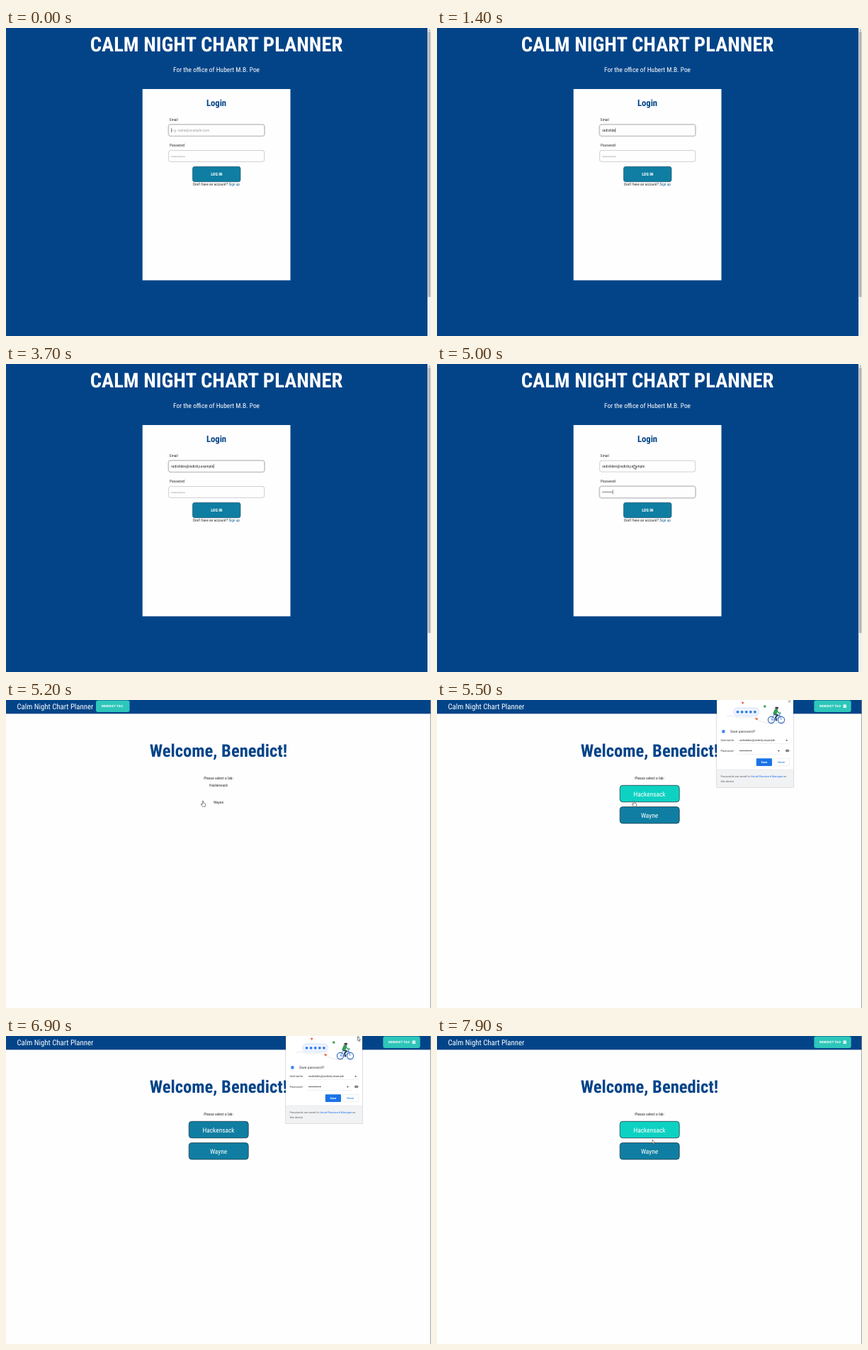
Write an HTML page that moves like this. It is 600 px wide and 434 px high and loops after 8 s.

```html
<!DOCTYPE html>
<html lang="en">
<head>
<meta charset="utf-8">
<title>Sleep lab login</title>
<style>
  html, body { margin: 0; width: 100%; height: 100%; overflow: hidden; background: #fffeff; }
  svg { display: block; width: 600px; height: 434px; }
  text { font-family: Roboto, "Liberation Sans", sans-serif; text-rendering: geometricPrecision; white-space: pre; }
  .cond { font-family: "Roboto Condensed", Roboto, "Liberation Sans", sans-serif; font-stretch: 75%; }
  .bold { font-weight: 700; }
  .mid { text-anchor: middle; }
</style>
</head>
<body>
<svg id="stage" viewBox="0 0 600 434" xmlns="http://www.w3.org/2000/svg"></svg>
<script>
const NAVY = '#034488', BLUE = '#0f7ea2', INK = '#2a2a2a', LINK = '#1a73e8';
const LOOP = 8000, STEP = 100;
const EMAIL = 'radishdev@radishy.example';
const stage = document.getElementById('stage');
const $ = id => document.getElementById(id);

// Narrow plain Roboto evenly when no condensed face is available.
stage.innerHTML = '<text id="a" class="cond" font-size="50">Sample words</text><text id="b" font-size="50">Sample words</text>';
const narrow = $('a').getComputedTextLength() < 0.95 * $('b').getComputedTextLength() ? 1 : 0.88;

const text = (x, y, size, str, fill = INK, cls = 'cond', id = '') =>
  `<text ${id && `id="${id}"`} class="${cls}" font-size="${size}" fill="${fill}" ` +
  `transform="translate(${x} ${y}) scale(${cls.includes('cond') ? narrow : 1} 1)">${str}</text>`;
const rect = (x, y, w, h, fill, r = 0, more = '') =>
  `<rect x="${x}" y="${y}" width="${w}" height="${h}" rx="${r}" fill="${fill}" ${more}/>`;
const circle = (x, y, r, fill, more = '') => `<circle cx="${x}" cy="${y}" r="${r}" fill="${fill}" ${more}/>`;
const path = (d, fill, more = '') => `<path d="${d}" fill="${fill}" ${more}/>`;
const line = (color, w) => `stroke="${color}" stroke-width="${w}"`;
const dots = (n, x, y, gap, r, fill) =>
  Array.from({ length: n }, (_, i) => circle(x + i * gap, y, r, fill)).join('');

const field = (y, id) =>
  rect(229.7, y, 135, 15.8, 'none', 3, `id="${id}" ${line('#d0d1d5', 2.6)}`) +
  rect(229.7, y, 135, 15.8, '#fffeff', 2.6, line('#adafb3', 0.6));

const login = () => `<g id="login">
  ${rect(0, 0, 600, 434, NAVY)}
  ${text(297, 33, 28.7, 'CALM NIGHT CHART PLANNER', '#fff', 'cond bold mid')}
  ${text(297, 62, 9.45, 'For the office of Hubert M.B. Poe', '#fff', 'cond mid')}
  ${rect(192.7, 86, 208.8, 269.5, '#fffeff')}
  ${text(297, 110.3, 12.7, 'Login', NAVY, 'cond bold mid')}
  ${text(231, 130.8, 5.4, 'Email')}
  ${field(136.2, 'ring1')}
  ${text(233.3, 146, 5.4, 'e.g. name@example.com', '#a4a4a4', 'cond', 'hint1')}
  ${text(233.3, 146, 5.44, '', INK, 'cond', 'email')}
  ${text(231, 167, 5.4, 'Password')}
  ${field(172.6, 'ring2')}
  ${text(233.3, 183.6, 5.6, '********', '#a4a4a4', 'cond', 'hint2')}
  <g id="secret"></g>
  ${rect(0, 0, 0.5, 6.4, '#222', 0, 'id="caret"')}
  ${rect(263.5, 195.3, 67.5, 21.4, BLUE, 3, line('#2a566e', 0.7))}
  ${text(297.3, 208.2, 5.9, 'LOG IN', '#fff', 'cond bold mid')}
  ${text(297, 222.3, 5.4, `Don't have an account? <tspan fill="#17628f">Sign up</tspan>`, INK, 'cond mid')}
  ${rect(595, 0, 5, 434, '#f1f1f1')}
  ${rect(595.7, 5, 3.7, 374, '#b4b4b6')}
  ${path('M596.4 3.4h2.4l-1.2-1.5z', '#666')}
</g>`;

const labButton = (y, name, id) =>
  rect(258.2, y, 84, 23.4, BLUE, 4, `id="${id}" ${line('#1d3f50', 0.8)}`) +
  text(300, y + 15.3, 9.4, name, '#fff', 'cond mid');

const userTag = (x, w, textX) =>
  rect(x, 0.6, w, 16.4, '#2ec6ba', 3) + text(textX, 10.2, 4.3, 'BENEDICT TILO', '#fff', 'bold mid');

const home = () => `<g id="home">
  ${rect(0, 0, 600, 434, '#fffeff')}
  ${rect(0, 0, 600, 19.4, NAVY)}
  ${text(15.4, 12.7, 10.8, 'Calm Night Chart Planner', '#fff')}
  ${text(300, 80, 24.6, 'Welcome, Benedict!', NAVY, 'cond bold mid')}
  ${text(300, 112.3, 5.45, 'Please select a lab:', INK, 'cond mid')}
  <g id="plain">
    ${userTag(127, 47.5, 150)}
    ${text(300, 122.4, 5.4, 'Hackensack', INK, 'cond mid')}
    ${text(300, 146, 5.4, 'Wayne', INK, 'cond mid')}
  </g>
  <g id="styled">
    ${userTag(532.3, 52.4, 555)}
    ${rect(573.6, 6.6, 4.4, 4.4, '#fff', 0.7)}
    ${path('M574.6 8.8h2.4M576 7.8l1 1l-1 1', 'none', line('#2ec6ba', 0.6))}
    ${labButton(120.3, 'Hackensack', 'lab')}
    ${labButton(150.5, 'Wayne', 'lab2')}
  </g>
  ${rect(0, 432, 101, 2, '#dcdde0', 0, 'id="status"')}
  ${rect(599.2, 0, 0.8, 434, '#8d8f93')}
  ${popup()}
</g>`;

const select = (y, arrowX) =>
  rect(424, y, 74, 10, '#fff') + rect(424, y + 9.6, 74, 0.4, '#dadce0') +
  path(`M${arrowX - 1.5} ${y + 4.3}h3l-1.5 1.8z`, '#444');

function popup() {
  const wheel = x => circle(x, 28, 4.6, '#fff', line('#2b62b8', 1.1));
  return `<g id="popup">
  ${rect(394.4, -4, 109.2, 128, '#000', 1.5, 'opacity=".22"')}
  ${rect(395, -4, 108, 127.3, '#fff', 1)}
  ${path('M409 24C416 20 419 24 427 25S441 22 449 26S459 32 468 32.6H493', 'none', line('#d5d8dd', 0.6))}
  ${rect(419, 11, 35.5, 11.5, '#edf3fe', 5, line('#c4d7f6', 0.6))}
  ${dots(5, 424.5, 16.8, 6.1, 1.9, '#2f7de1')}
  ${path('M429.6 2.6l4 .4l-2 3.3z', '#e8663c')}
  ${path('M449.4 24.6l4.4 1.8l-3.4 2.2z', '#e8663c')}
  ${circle(462.8, 9, 1.7, '#2f9e55')}
  ${wheel(472)}${wheel(486)}
  ${path('M472 28L476 20.6L484 21.6L479 28ZM484 21.6L486 28M484 21.6L483.6 18.4h2.4', 'none', line('#3c78d8', 0.9))}
  ${path('M475.5 19.5L481 21.4L478 24.4L479.4 29.4', 'none', line('#253858', 1.9))}
  ${path('M474 19.6L477 12.6L481 13.2L479.4 20.4Z', '#2f9e55')}
  ${path('M480 14.6L482 18L485 18.4', 'none', line('#2f9e55', 1.4))}
  ${circle(479.8, 11.6, 1.9, '#8a5544')}
  ${path('M476.4 11.4q1.6-2.6 5.8-1.2l-.4 1.2z', '#253858')}
  ${path('M496 .4l3 3m0-3l-3 3', 'none', line('#555', 0.7))}
  ${circle(404.4, 44.4, 2.3, '#4285f4')}
  ${text(414, 46.4, 4.9, 'Save password?', '#333', '')}
  ${text(400.4, 58.2, 4.1, 'Username', '#444', '')}
  ${select(52, 493.6)}
  ${text(427, 58.2, 4.02, EMAIL, '#333', '')}
  ${text(400.4, 72.9, 4.1, 'Password', '#444', '')}
  ${select(66.6, 482.4)}
  ${rect(487.4, 66, 11, 11, '#fff')}
  ${dots(8, 428, 71.5, 2.25, 0.8, '#333')}
  ${path('M491.8 71.4q2.9-3.8 5.8 0q-2.9 3.8-5.8 0z', '#555')}
  ${circle(494.7, 71.4, 1, '#fff')}${circle(494.7, 71.4, 0.5, '#555')}
  ${rect(450.8, 82.2, 22.2, 10.8, LINK, 1.2)}
  ${text(461.9, 89, 4, 'Save', '#fff', 'bold mid')}
  ${rect(475.2, 82.4, 22.4, 10.4, '#fff', 1.2, line('#dadce0', 0.5))}
  ${text(486.4, 89, 4, 'Never', LINK, 'mid')}
  ${rect(395, 98, 108, 25.3, '#f1f2f4')}${rect(395, 97.8, 108, 0.4, '#dadce0')}
  ${text(400.4, 108.8, 3.9, `Passwords are saved to <tspan fill="${LINK}">Vornel Password Manager</tspan> on`, '#5f6368', '')}
  ${text(400.4, 115.6, 3.9, 'this device.', '#5f6368', '')}
</g>`;
}

const pointers = () => `<g id="cursor">
  ${path('M0 0V5.7L1.3 4.6L2.3 6.8L3.2 6.4L2.2 4.3H4Z', '#fff', 'id="arrow" stroke-linejoin="round" ' + line('#333', 0.55))}
  ${path('M-.8 .6Q0-.4 .7 .6V3.1L3.4 3.9Q4 4.2 3.9 5L3.2 8.2H-.5L-2.8 5Q-2.6 4-1.6 4.4L-.8 5.2Z', '#fff', 'id="hand" stroke-linejoin="round" ' + line('#333', 0.6))}
</g>`;

stage.innerHTML = login() + home() + pointers();

// [time, letters shown]
const emailKeys = [[0, 0], [600, 1], [700, 2], [800, 3], [900, 4], [1000, 5], [1200, 6], [1300, 7], [1400, 8],
  [1500, 9], [1700, 10], [1900, 11], [2000, 12], [2200, 13], [2300, 14], [2400, 15], [2500, 16], [2600, 17],
  [2700, 18], [2900, 19], [3000, 21], [3400, 22], [3600, 24], [3700, 25]];
const secretKeys = [[0, 0], [4100, 1], [4200, 2], [4300, 3], [4400, 4], [4500, 5], [4700, 6], [4800, 7]];
// [time, x, y]
const route = [[5000, 278, 142], [5700, 278, 142], [6000, 480, 42], [6200, 526.5, 11], [6400, 522, 8],
  [6700, 496.5, 1], [7000, 496.5, 1], [7300, 410, 82], [7600, 322, 138], [7800, 305, 140], [7900, 304, 146]];
// [time, strength]
const hover = [[0, 0], [5300, 1], [5700, 1], [5900, 0], [7500, 0], [7700, 1], [8000, 1]];

const latest = (table, t) => table.filter(k => k[0] <= t).pop()[1];
function blend(table, t, col) {
  const i = table.findIndex(k => k[0] > t);
  if (i < 0) return table[table.length - 1][col];
  if (i === 0) return table[0][col];
  const a = table[i - 1], b = table[i];
  return a[col] + (b[col] - a[col]) * (t - a[0]) / (b[0] - a[0]);
}
const show = (id, on) => $(id).style.display = on ? '' : 'none';
const mix = (a, b, p) => `rgb(${a.map((v, i) => Math.round(v + (b[i] - v) * p))})`;

function drawLogin(t) {
  const typed = latest(emailKeys, t), secret = latest(secretKeys, t);
  const inEmail = t < 3900;
  const email = $('email');
  email.textContent = EMAIL.slice(0, typed);
  $('secret').innerHTML = dots(secret, 234.3, 180.4, 2.1, 0.65, INK);
  show('hint1', !typed);
  show('hint2', !secret);
  show('ring1', inEmail);
  show('ring2', !inEmail);
  show('caret', t < 200 || t >= 600);
  const width = inEmail ? (typed ? email.getComputedTextLength() * narrow : 0) : secret * 2.1;
  $('caret').setAttribute('x', 233.2 + width);
  $('caret').setAttribute('y', inEmail ? 140.8 : 177.2);
}

function drawHome(t) {
  const styled = t >= 5300;
  show('plain', !styled);
  show('styled', styled);
  show('popup', t >= 5500 && t < 7000);
  show('status', t >= 6100 && t < 6300);
  $('lab').setAttribute('fill', mix([15, 126, 162], [13, 210, 194], blend(hover, t, 1)));
}

function draw(t) {
  const atHome = t >= 5200;
  show('login', !atHome);
  show('home', atHome);
  (atHome ? drawHome : drawLogin)(t);

  const x = blend(route, t, 1), y = blend(route, t, 2);
  const overLab = x > 258 && x < 342 && y > 120 && y < 144;
  show('cursor', t >= 5000);
  show('hand', atHome && overLab);
  show('arrow', !(atHome && overLab));
  $('cursor').setAttribute('transform', `translate(${x} ${y})`);
}

const start = performance.now();
let last = -1;
function tick() {
  const t = Math.floor(((performance.now() - start) % LOOP) / STEP) * STEP;
  if (t !== last) draw(last = t);
  requestAnimationFrame(tick);
}
tick();
</script>
</body>
</html>
```
